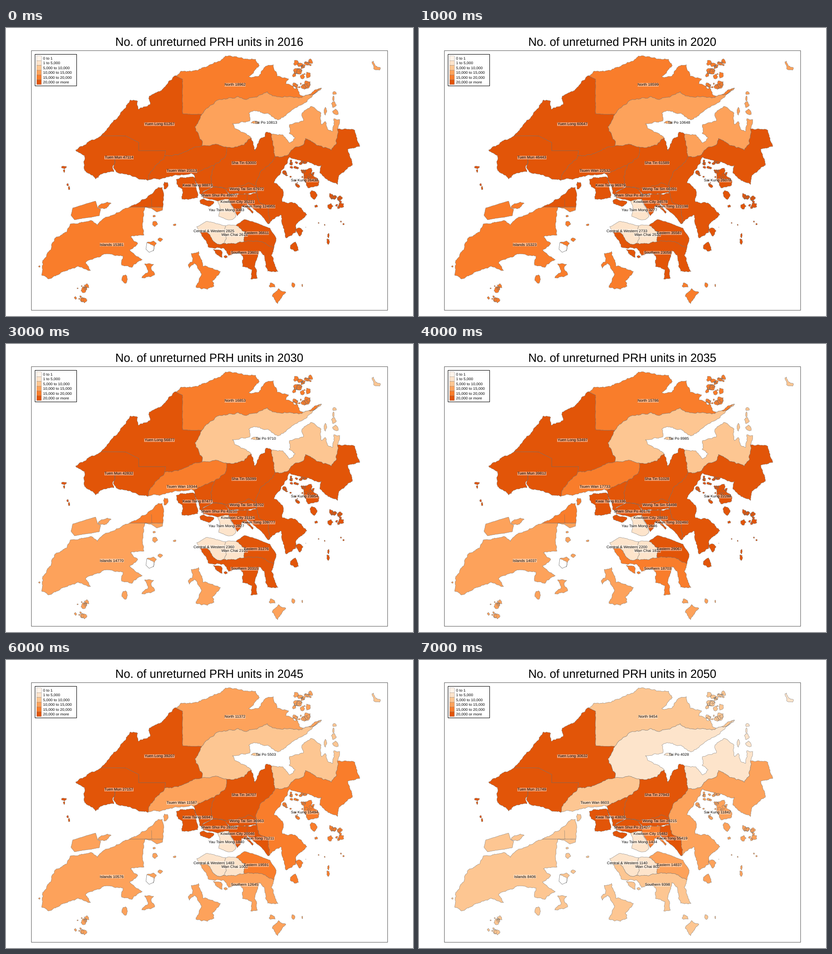
Animation of 890x629 px, one loop 8000 ms. Source, as a matplotlib script:

```python
import math
import random

import matplotlib.pyplot as plt
from matplotlib.animation import FuncAnimation
from matplotlib.patches import PathPatch, Rectangle
from matplotlib.path import Path

W, H, DPI = 890, 629, 100
PX = 72 / DPI  # points per pixel
plt.rcParams["font.family"] = "Liberation Sans"
plt.rcParams["text.hinting"] = "none"

YEARS = (2016, 2020, 2025, 2030, 2035, 2040, 2045, 2050)
LIMITS = (1, 5000, 10000, 15000, 20000)
SHADES = ("#fff5eb", "#fde4cb", "#fdc692", "#fda25b", "#f97d2b", "#e25508")
CLASSES = ("0 to 1", "1 to 5,000", "5,000 to 10,000", "10,000 to 15,000",
           "15,000 to 20,000", "20,000 or more")

fig = plt.figure(figsize=(W / DPI, H / DPI), dpi=DPI, facecolor="white")
ax = fig.add_axes([0, 0, 1, 1])
ax.set_xlim(0, W)
ax.set_ylim(H, 0)
ax.axis("off")


def bend(a, b, rough, rng):
    """Fractal midpoint displacement from a to b, without a itself."""
    dx, dy = b[0] - a[0], b[1] - a[1]
    size = math.hypot(dx, dy)
    if size < 3 or not rough:
        return [b]
    k = rng.uniform(-rough, rough) * min(1, 12 / size)
    mid = ((a[0] + b[0]) / 2 - dy * k, (a[1] + b[1]) / 2 + dx * k)
    return bend(a, mid, rough, rng) + bend(mid, b, rough, rng)


def line(*v, rough=0.16):
    """Natural line through a few key points."""
    rng = random.Random(sum(v))
    keys = list(zip(v[::2], v[1::2]))
    out = keys[:1]
    for a, b in zip(keys, keys[1:]):
        out += bend(a, b, rough, rng)
    return out


def ring(*v, rough=0.16):
    return line(*v, *v[:2], rough=rough)


def blob(x, y, rx, ry):
    rng = random.Random(round(x * 1000 + y))
    v = []
    for i in range(9):
        t, r = math.tau * i / 9, rng.uniform(0.65, 1.25)
        v += [x + rx * r * math.cos(t), y + ry * r * math.sin(t)]
    return ring(*v)


def islets(n, x, y, rx, ry, size):
    """Islets of mixed size, strewn over an ellipse."""
    rng = random.Random(n + x + y)
    out = []
    for _ in range(n):
        t, d = rng.uniform(0, math.tau), math.sqrt(rng.random())
        s = size * rng.uniform(0.2, 1)
        out.append(blob(x + rx * d * math.cos(t), y + ry * d * math.sin(t),
                        s, s * rng.uniform(0.6, 1.3)))
    return out


def series(y16, y25, y30, y40, y45, y50):
    """Counts for all years; 2020 and 2035 lie between their neighbours."""
    y20 = round(y16 + 0.45 * (y25 - y16))
    y35 = round(y30 + 0.35 * (y40 - y30))
    return y16, y20, y25, y30, y35, y40, y45, y50


def shade(value):
    return SHADES[sum(value >= limit for limit in LIMITS)]


districts = []


def district(name, x, y, values, *shapes):
    paths = [Path(s + s[:1], closed=True) for s in shapes]
    area = PathPatch(Path.make_compound_path(*paths), ec="#6b6b6b", lw=0.5 * PX, zorder=2)
    ax.add_patch(area)
    label = ax.text(x, y + 3, "", size=8.4 * PX, ha="center", va="baseline", zorder=5,
                    bbox=dict(boxstyle="square,pad=0.04", fc=(1, 1, 1, 0.42), ec="none"))
    districts.append((name, series(*values), area, label))


# Borders shared by two districts
yl_no = line(370, 104, 386, 112, 386, 187, 428, 189, rough=0.05)
no_tp = line(428, 189, 460, 159, 508, 150, 522, 156, 550, 150, 571, 139, 582, 148, 609, 149,
             640, 153, 668, 146, 690, 131)
yl_tp = line(428, 189, 413, 216, 430, 250, 429, 257)
yl_tw = line(347, 279, 385, 273, 410, 261, 429, 257)
yl_tm = line(208, 235, 262, 236, 290, 250, 290, 268, 349, 268, 347, 279, rough=0)
tm_tw = line(347, 279, 322, 308, 312, 321, 310, 333)
tp_tw = line(429, 257, 462, 254, 482, 260)
tp_st = line(482, 260, 520, 256, 536, 240)
tp_bay = line(581, 232, 586, 262, 588, 281)
tw_st = line(482, 260, 479, 283, 455, 300)
tw_kt = line(455, 300, 441, 306, 411, 321)
tp_sk = line(588, 281, 612, 279, 630, 262, 652, 253, 655, 241, 678, 255, 711, 267, 723, 252,
             725, 220)
st_sk = line(588, 281, 583, 292, 558, 312, 547, 345)
sk_kt = line(547, 345, 552, 377, 574, 391, 573, 428)
st_wts = line(547, 345, 530, 338, 505, 348, 478, 350)
st_kt = line(478, 350, 453, 347, 449, 334, 455, 300)
wts_south = line(478, 350, 489, 364, 527, 362, 547, 360)
cw_south = line(476, 470, 462, 472, 440, 446, 424, 446)
cw_wc = line(480, 432, 477, 445, 482, 460, 476, 470)
wc_south = line(476, 470, 505, 470, 521, 466)
wc_ea = line(503, 431, 522, 444, 521, 466)
ea_south = line(521, 466, 560, 467, 586, 480)

lantau = line(270, 391, 215, 415, 200, 431, 186, 420, 140, 429, 132, 446, 107, 459, 100, 478,
              80, 508, 78, 540, 92, 548, 158, 520, 185, 530, 174, 512, 212, 495, 256, 498,
              253, 518, 275, 523, 298, 506, 270, 485, 288, 470, 272, 456, 302, 452, 298, 430,
              301, 400, 303, 391)
lamma = ring(405, 492, 421, 488, 430, 520, 469, 532, 451, 553, 455, 564, 440, 571, 416, 567,
             428, 537, 412, 514, 401, 525, 399, 516, 408, 510)
district("Islands", 231.5, 472.5, (15381, 15253, 14770, 12677, 10576, 8406),
         lantau, lamma,
         ring(303, 391, 343, 391, 342, 398, 330, 402, 318, 394, rough=0.03),
         ring(142, 409, 146, 393, 196, 378, 200, 392, 207, 396, 204, 410, 150, 419, rough=0.03),
         ring(201, 392, 208, 384, 222, 380, 230, 383, 215, 395),
         ring(303, 515, 323, 516, 317, 526, 325, 539, 297, 546, 310, 534),
         ring(308, 469, 322, 465, 329, 470, 322, 487, 323, 476),
         ring(582, 586, 596, 569, 612, 577, 594, 602),
         *(blob(*b) for b in ((582, 562, 7, 5), (628, 562, 4, 6), (648, 562, 1, 3),
                              (325, 428, 6, 7), (324, 411, 3, 2), (369, 430, 3, 2),
                              (337, 462, 5, 4), (260, 548, 7, 8), (73, 521, 2, 2))),
         *islets(6, 168, 567, 12, 6, 6), *islets(5, 162, 592, 12, 8, 7))
ax.plot([308, 306, 313, 322], [469, 483, 490, 486], color="#6b6b6b", lw=0.7 * PX)

district("Tsuen Wan", 384.5, 311, (23113, 21822, 19344, 14740, 11587, 8603),
         yl_tw + tp_tw + tw_st + tw_kt
         + line(411, 321, 405, 317, 384, 320, 350, 326, 310, 333) + tm_tw[::-1],
         line(270, 391, 311, 367, 333, 348, 342, 348, 343, 391),
         line(318, 372, 319, 391, rough=0), blob(349, 344, 5, 8))

district("North", 501, 123, (18962, 18155, 16853, 13803, 11372, 9454),
         yl_no + no_tp
         + line(690, 131, 651, 150, 641, 144, 634, 130, 612, 122, 618, 111, 593, 105, 585, 80,
                570, 83, 553, 105, 531, 106, 554, 82, 546, 68, 480, 61, 462, 74, 440, 84,
                412, 93, 383, 94, 370, 104),
         *islets(12, 652, 78, 20, 8, 6), *islets(16, 645, 112, 25, 20, 8))

district("Yuen Long", 335.5, 209, (61267, 59889, 56877, 47221, 39207, 30632),
         yl_no + yl_tp + yl_tw[::-1] + yl_tm[::-1]
         + line(208, 235, 236, 201, 262, 174, 272, 157, 288, 160, 290, 178, 315, 167, 313, 149,
                343, 133, 370, 104))

district("Tuen Mun", 247, 282, (47114, 45623, 42832, 34202, 27157, 21749),
         yl_tm + tm_tw
         + line(310, 333, 290, 330, 272, 321, 241, 314, 235, 303, 239, 286, 233, 303, 236, 314,
                206, 320, 196, 330, 172, 311, 172, 279, 152, 267, 181, 248, 208, 235),
         *(blob(*b) for b in ((127, 304, 5, 3), (127, 312, 2, 4), (135, 342, 2, 3),
                              (138, 350, 2, 4))))

district("Tai Po", 568.5, 206, (10813, 10447, 9710, 7638, 5503, 4028),
         no_tp
         + line(690, 131, 655, 163, 595, 201, 572, 186, 548, 181, 531, 186, 533, 203, 495, 209,
                500, 219, 536, 240)
         + tp_st[::-1] + tp_tw[::-1] + yl_tp[::-1],
         tp_bay + tp_sk
         + line(725, 220, 730, 200, 717, 198, 714, 226, 704, 222, 698, 204, 690, 211, 689, 186,
                668, 171, 648, 185, 650, 203, 620, 211, 619, 230, 632, 240, 620, 251, 604, 233,
                581, 232),
         ring(800, 74, 804, 72, 808, 83, 819, 87, 817, 92, 804, 89),
         *(blob(*b) for b in ((718, 142, 5, 4), (717, 168, 5, 7), (720, 184, 7, 6),
                              (716, 154, 2, 5), (698, 182, 3, 9), (545, 206, 8, 4))))

district("Sha Tin", 520.5, 294, (63000, 59865, 55099, 43468, 34707, 27943),
         tp_st
         + line(536, 240, 544, 268, 558, 240, 566, 238, 568, 228, 581, 232)
         + tp_bay + st_sk + st_wts + st_kt + tw_st[::-1])

district("Sai Kung", 652.5, 332, (26438, 25638, 23854, 19380, 15494, 11842),
         tp_sk
         + line(725, 220, 763, 224, 774, 258, 747, 266, 757, 300, 728, 322, 725, 342, 704, 333,
                686, 316, 690, 300, 668, 295, 637, 288, 620, 282, 608, 306, 586, 338, 605, 353,
                604, 380, 632, 382, 658, 408, 634, 430, 634, 446, 613, 459, 601, 408, 573, 428)
         + sk_kt[::-1] + st_sk[::-1],
         ring(650, 312, 668, 306, 668, 318, 682, 329, 684, 343, 660, 349, 651, 330),
         *(blob(*b) for b in ((631, 478, 10, 10), (641, 443, 7, 10), (673, 364, 8, 10),
                              (678, 389, 3, 3), (705, 453, 2, 5), (704, 466, 3, 6))),
         *islets(26, 640, 315, 34, 30, 5), *islets(10, 720, 379, 14, 16, 8),
         *islets(5, 700, 430, 45, 40, 2))

district("Kwai Tsing", 419, 343, (98873, 94664, 87477, 69931, 56947, 43826),
         st_kt[::-1] + line(453, 347, 430, 359, 431, 371, 423, 361, 411, 321) + tw_kt[::-1],
         ring(372, 331, 382, 326, 409, 325, 419, 371, 385, 374, 386, 353, 377, 347))

district("Wong Tai Sin", 526, 351, (67972, 64459, 58702, 46691, 36963, 28215),
         st_wts + wts_south)

district("Sham Shui Po", 466, 365, (49977, 47266, 43210, 34542, 28319, 21427),
         line(453, 347, 478, 350, 489, 364, 487, 374, 463, 378, 431, 371, 430, 359, rough=0.08),
         ring(424, 377, 432, 373, 455, 380, 443, 390, 426, 384))

district("Kowloon City", 506.5, 379, (35221, 33791, 31124, 24579, 20046, 15482),
         line(489, 364, 527, 362, 527, 386, 541, 402, 539, 405, 525, 391, 515, 389, 513, 402,
              506, 410, 487, 374, rough=0.06))

district("Kwun Tong", 553, 389, (124955, 118828, 109777, 88871, 71211, 55419),
         line(527, 362, 547, 360) + sk_kt[3:]
         + line(573, 428, 560, 411, 528, 384, 527, 362, rough=0.06))

district("Yau Tsim Mong", 482, 397, (3383, 3147, 2827, 2310, 1840, 1434),
         ring(463, 378, 487, 374, 503, 411, 496, 418, 485, 419, 465, 411, 468, 395, rough=0.08))

district("Southern", 521.5, 490, (23601, 22395, 20315, 15708, 12645, 9398),
         cw_south[::-1] + wc_south + ea_south
         + line(586, 480, 580, 496, 595, 532, 572, 531, 565, 496, 553, 486, 544, 519, 550, 546,
                535, 548, 538, 528, 517, 521, 519, 504, 508, 491, 487, 497, 476, 481, 442, 478,
                424, 446),
         ring(453, 484, 470, 485, 473, 501, 465, 497), blob(480, 500, 4, 3))

district("Central & Western", 455, 442.5, (2825, 2621, 2360, 1904, 1483, 1140),
         cw_wc + cw_south + line(424, 446, 417, 434, 440, 422, 480, 432, rough=0.08))

district("Wan Chai", 499.5, 451, (2614, 2427, 2105, 1325, 1000, 800),
         cw_wc + wc_south + wc_ea[::-1] + line(503, 431, 490, 430, 480, 432))

district("Eastern", 547.5, 447, (36611, 34335, 31276, 24964, 19591, 14837),
         wc_ea + ea_south
         + line(586, 480, 591, 460, 577, 437, 545, 425, 522, 418, 503, 431, rough=0.08))

# Frame, heading and legend
ax.add_patch(Rectangle((55.5, 49.5), 779, 567, fill=False, ec="#333333", lw=0.8 * PX,
                       snap=False))
heading = ax.text(444.5, 40, "", size=25.5 * PX, ha="center", va="baseline")
ax.add_patch(Rectangle((63.5, 57.5), 91, 69, fc="white", ec="black", lw=PX, snap=False))
for i, (color, text) in enumerate(zip(SHADES, CLASSES)):
    y = 60.8 + 10.45 * i
    ax.add_patch(Rectangle((67, y), 10.4, 10.45, fc=color, ec="#777777", lw=0.4 * PX,
                           snap=False))
    ax.text(80.6, y + 8.2, text, size=8.4 * PX, va="baseline")


def draw(i):
    heading.set_text(f"No. of unreturned PRH units in {YEARS[i]}")
    for name, values, area, label in districts:
        area.set_facecolor(shade(values[i]))
        label.set_text(f"{name} {values[i]}")
    return []


anim = FuncAnimation(fig, draw, frames=len(YEARS), init_func=lambda: draw(0),
                     interval=1000, repeat=True, repeat_delay=0, blit=False)
plt.show()
```
